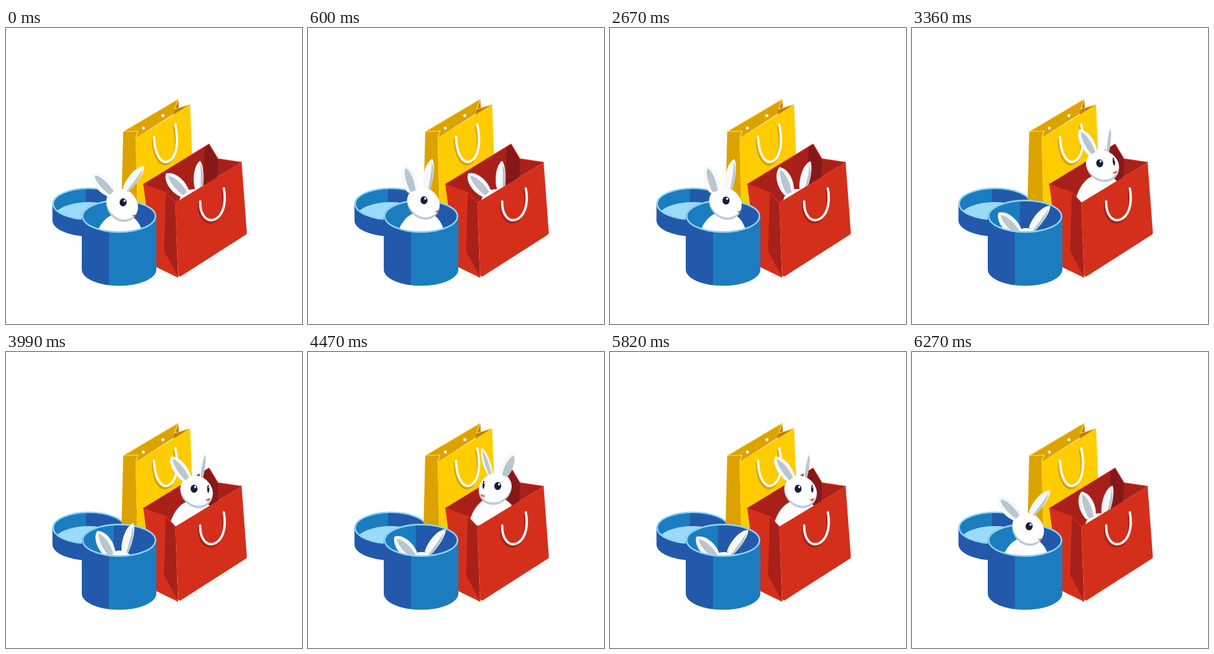
An HTML page with a canvas for the animation above (6300 ms loop, 500x500 px).

```html
<!DOCTYPE html>
<html lang="en">
<head>
<meta charset="utf-8">
<title>Rabbits in boxes</title>
<style>
html, body { margin: 0; width: 100%; height: 100%; overflow: hidden; background: #fff; }
canvas { display: block; width: 500px; height: 500px; }
</style>
</head>
<body>
<canvas id="stage" width="500" height="500"></canvas>
<script>
const g = document.getElementById('stage').getContext('2d');
const LOOP = 6300;
const BLUE = '#1b7dbf', NAVY = '#2359ab', SKY = '#9bdaf8', RIM = '#8ed4f6';
const RED = '#d42f1b', WINE = '#a9201a', DARK = '#86181a';
const GOLD = '#ffcc00', OCHRE = '#dca300', AMBER = '#c47a10';
const SHADE = '#bccad5', FUR = '#f6f8fa', INNER = '#b9c6cf', INK = '#14203a';

// ---------- drawing helpers ----------
function trace(pts) {
  g.beginPath();
  for (let i = 0; i < pts.length; i += 2) g.lineTo(pts[i], pts[i + 1]);
}
function fill(color) {
  g.fillStyle = color;
  g.fill();
}
function stroke(color, width) {
  g.strokeStyle = color;
  g.lineWidth = width;
  g.lineCap = g.lineJoin = 'round';
  g.stroke();
}
function poly(color, ...pts) {
  trace(pts);
  g.closePath();
  fill(color);
}
function line(color, width, ...pts) {
  trace(pts);
  stroke(color, width);
}
function oval(x, y, rx, ry, color) {
  g.beginPath();
  g.ellipse(x, y, rx, ry, 0, 0, Math.PI * 2);
  if (color) fill(color);
}
function arc(x, y, rx, ry, from, to, color, width) {
  g.beginPath();
  g.ellipse(x, y, rx, ry, 0, from * Math.PI, to * Math.PI);
  stroke(color, width);
}
function clipped(makePath, draw) {
  g.save();
  makePath();
  g.clip();
  draw();
  g.restore();
}
function twoTone(split, left, right) {
  g.fillStyle = left;
  g.fillRect(0, 0, split, 500);
  g.fillStyle = right;
  g.fillRect(split, 0, 500, 500);
}

// ---------- containers ----------
function drum(x, top, bottom, rx, ry, split, innerSplit) {
  clipped(() => {
    g.beginPath();
    g.ellipse(x, bottom, rx, ry, 0, 0, Math.PI);
    g.ellipse(x, top, rx, ry, 0, Math.PI, Math.PI * 2);
  }, () => twoTone(split, NAVY, BLUE));
  clipped(() => oval(x, top, rx - 1, ry - 1), () => twoTone(innerSplit, BLUE, NAVY));
}
function lid() {
  drum(140, 297, 325, 61.5, 27, 140, 135);
  clipped(() => oval(140, 297, 60, 26), () => oval(140, 320, 59, 26, SKY));
  arc(140, 297, 60.3, 26.3, 0, 2, RIM, 2.6);
}
function boxBack() {
  drum(191, 318, 408, 63, 27.5, 174, 182);
  arc(191, 318, 61.5, 26.6, 1, 2, RIM, 2.6);
}
function boxFront() {
  arc(191, 318, 61.5, 26.6, 0, 1, RIM, 2.6);
}
function handle(shade, x, y, ...curve) {
  for (const [dx, dy, color] of [[-2, 4, shade], [0, 0, '#fff']]) {
    g.save();
    g.translate(dx, dy);
    g.beginPath();
    g.moveTo(x, y);
    g.bezierCurveTo(...curve);
    stroke(color, 4);
    g.restore();
  }
}
function yellowBag() {
  poly(OCHRE, 198, 175, 291, 120, 291, 140, 219, 186, 222, 310, 195, 300);
  poly(AMBER, 291, 120, 285, 137, 283, 147, 311, 129, 292, 135);
  poly(GOLD, 219, 186, 311, 129, 316, 260, 222, 312);
  line('#ffe06a', 1.2, 219, 186, 223, 174, 198, 175, 291, 120, 285, 137, 311, 129);
  oval(232, 169, 2.5, 2.5, '#fff');
  oval(265, 148, 2.5, 2.5, '#fff');
  handle(OCHRE, 250, 184, 252, 250, 301, 235, 286, 163);
}
function redBack() {
  poly(WINE, 232, 264, 343, 196, 358, 221, 398, 227, 286, 295, 270, 278);
  poly(DARK, 343, 196, 358, 221, 357, 254, 335, 266, 335, 201);
  line(RED, 1.4, 232, 264, 343, 196, 358, 221, 398, 227);
}
function redFront() {
  poly(RED, 232, 264, 270, 278, 286, 295, 291, 422, 250, 402);
  poly(WINE, 270, 278, 286, 295, 290, 419, 267, 377);
  g.beginPath();
  g.moveTo(286, 295);
  g.lineTo(398, 227);
  g.arcTo(407, 348, 291, 422, 4);
  g.arcTo(291, 422, 286, 295, 3);
  g.closePath();
  fill(RED);
  line(RED, 1.4, 232, 264, 270, 278, 286, 295);
  handle(WINE, 328, 293, 327, 343, 379, 332, 368, 271);
}

// ---------- rabbit ----------
const mix = (a, b, k) => a + (b - a) * k;
const clamp = (v, lo, hi) => Math.max(lo, Math.min(hi, v));

// Round head with a snout that follows the turn; yaw runs from -1 (left) to 1 (right).
function headPath(yaw, dy) {
  const turn = clamp(yaw * 1.5, -1, 1);
  g.beginPath();
  for (let i = 0; i < 60; i++) {
    const a = i * Math.PI / 30, c = Math.cos(a), s = Math.sin(a);
    const r = 27.3 + turn * c * (1 + 4 * s);
    g.lineTo(r * c, r * s + dy);
  }
  g.closePath();
}
function eye(x, y) {
  const w = 1 - (x / 25) ** 2;
  if (w <= 0) return;
  oval(x, y, 6 * w, 6.8, INK);
  oval(x + 2 * w, y - 3, 1.8 * w, 2, '#fff');
}
function mouth(x, y, dir) {
  g.beginPath();
  g.moveTo(x - 5 * dir, y);
  g.quadraticCurveTo(x, y + 1, x + 4 * dir, y - 3);
  g.quadraticCurveTo(x + 3 * dir, y + 6, x - 5 * dir, y);
  fill('#e4432f');
}
function lobe(len, left, right, color) {
  g.beginPath();
  g.moveTo(left * .75, 0);
  g.bezierCurveTo(left * 1.4, -len * .35, left * 1.15, -len * .85, 0, -len);
  g.bezierCurveTo(right * 1.15, -len * .85, right * 1.4, -len * .35, right * .75, 0);
  g.closePath();
  fill(color);
}
// An ear stands on the head outline at x; lo and hi bound its shaded part.
function ear(x, angle, len, width, bend, lo, hi) {
  g.save();
  g.translate(x, -Math.sqrt(26 * 26 - x * x));
  g.rotate(angle * Math.PI / 180);
  lobe(len, -width * (1 + bend), width * (1 - bend), FUR);
  lobe(len * .88, width * lo, width * hi, INNER);
  g.restore();
}
function rabbit({ x, y, tilt, yaw, ear1, ear2 }) {
  g.save();
  g.translate(x, y);
  g.beginPath();
  g.moveTo(-46, 62);
  g.bezierCurveTo(-39, 30, -22, 14, -2, 14);
  g.bezierCurveTo(20, 14, 36, 30, 38, 62);
  fill('#fff');

  g.save();
  g.rotate(tilt * Math.PI / 180);
  headPath(yaw, 0);
  fill(SHADE);
  g.clip();
  headPath(yaw, -4);
  fill('#fff');
  eye(-12 + 14 * yaw, -5);
  eye(12 + 14 * yaw, -5);
  mouth(25 * Math.sin(1.5 * yaw), 13, Math.sign(yaw));
  g.restore();

  const side = Math.max(0, yaw - .6);
  ear(12 - 4 * yaw, ear2, 43 + 20 * side, Math.min(9, 3.5 + 10 * Math.abs(yaw - .6)),
    .25, -.6 + 2 * side, .7);
  ear(-12 - 4.5 * yaw, ear1, 47, 8 + 3.5 * yaw, 0, -.45, .5);
  g.restore();
}

// ---------- motion ----------
function ramp(t, from, to) {
  const k = clamp((t - from) / (to - from), 0, 1);
  return k * k * (3 - 2 * k);
}
const pulse = (t, from, to) => Math.sin(Math.PI * clamp((t - from) / (to - from), 0, 1)) ** 2;

function boxRabbit(t) {
  const out = 1 - ramp(t, 2640, 3300) + ramp(t, 5850, 6240);
  const perk = ramp(t, 60, 450) - ramp(t, 2700, 3240) + ramp(t, 3330, 3840)
    - ramp(t, 3990, 4560) + pulse(t, 5190, 5820);
  const twitch = pulse(t, 600, 870) + pulse(t, 930, 1230);
  const rest = 1 - perk;
  return {
    x: 194 + rest,
    y: mix(363, 296, out) + 3 * rest - 4 * pulse(t, 5970, 6270),
    tilt: 10 * rest,
    yaw: 1,
    ear1: mix(-44, -30 + 12 * out, perk) + 3 * twitch,
    ear2: mix(37, 15 - 6 * out, perk) + 5 * twitch - 4 * pulse(t, 4860, 5010)
  };
}
function bagRabbit(t) {
  const out = ramp(t, 2640, 3180) - ramp(t, 5850, 6240);
  const left = ramp(t, 3990, 4500) - ramp(t, 5220, 5790);
  const calm = ramp(t, 3390, 3960);
  const perk = .25 * pulse(t, 1260, 1440) + ramp(t, 1530, 1710)
    - 1.3 * (ramp(t, 1860, 1980) - ramp(t, 2100, 2310));
  const twitch = pulse(t, 60, 450) + pulse(t, 600, 870) + pulse(t, 930, 1230);
  const hop = 5 * pulse(t, 3000, 3360) + 4 * pulse(t, 3390, 3900) + 8 * pulse(t, 5820, 6090);
  return {
    x: 319 + 2 * out - 4 * left,
    y: mix(300, 233 + 3 * calm - 5 * left, out) - hop,
    tilt: out * (7 * calm - 7 + 5 * left),
    yaw: mix(1, .62, out) - 1.27 * left,
    ear1: mix(mix(-43, -20, perk), -30 - 6 * calm + 18 * left, out) + 2 * twitch,
    ear2: mix(mix(1, 13, perk), 7 + 2 * calm + 8 * left, out) - 3 * twitch
      + 8 * (pulse(t, 4200, 4740) + pulse(t, 5190, 5520))
  };
}

// ---------- scene ----------
function insideBag() {
  trace([232, 0, 232, 264, 270, 278, 286, 295, 398, 227, 398, 0]);
}
function insideBox() {
  g.beginPath();
  g.moveTo(129, 0);
  g.ellipse(191, 318, 62, 27, 0, Math.PI, 0, true);
  g.lineTo(253, 0);
  g.closePath();
}
function render(t) {
  g.fillStyle = '#fff';
  g.fillRect(0, 0, 500, 500);
  lid();
  yellowBag();
  redBack();
  clipped(insideBag, () => rabbit(bagRabbit(t)));
  redFront();
  boxBack();
  clipped(insideBox, () => rabbit(boxRabbit(t)));
  boxFront();
}
const start = performance.now();
function tick() {
  render((performance.now() - start) % LOOP);
  requestAnimationFrame(tick);
}
tick();
</script>
</body>
</html>
```
